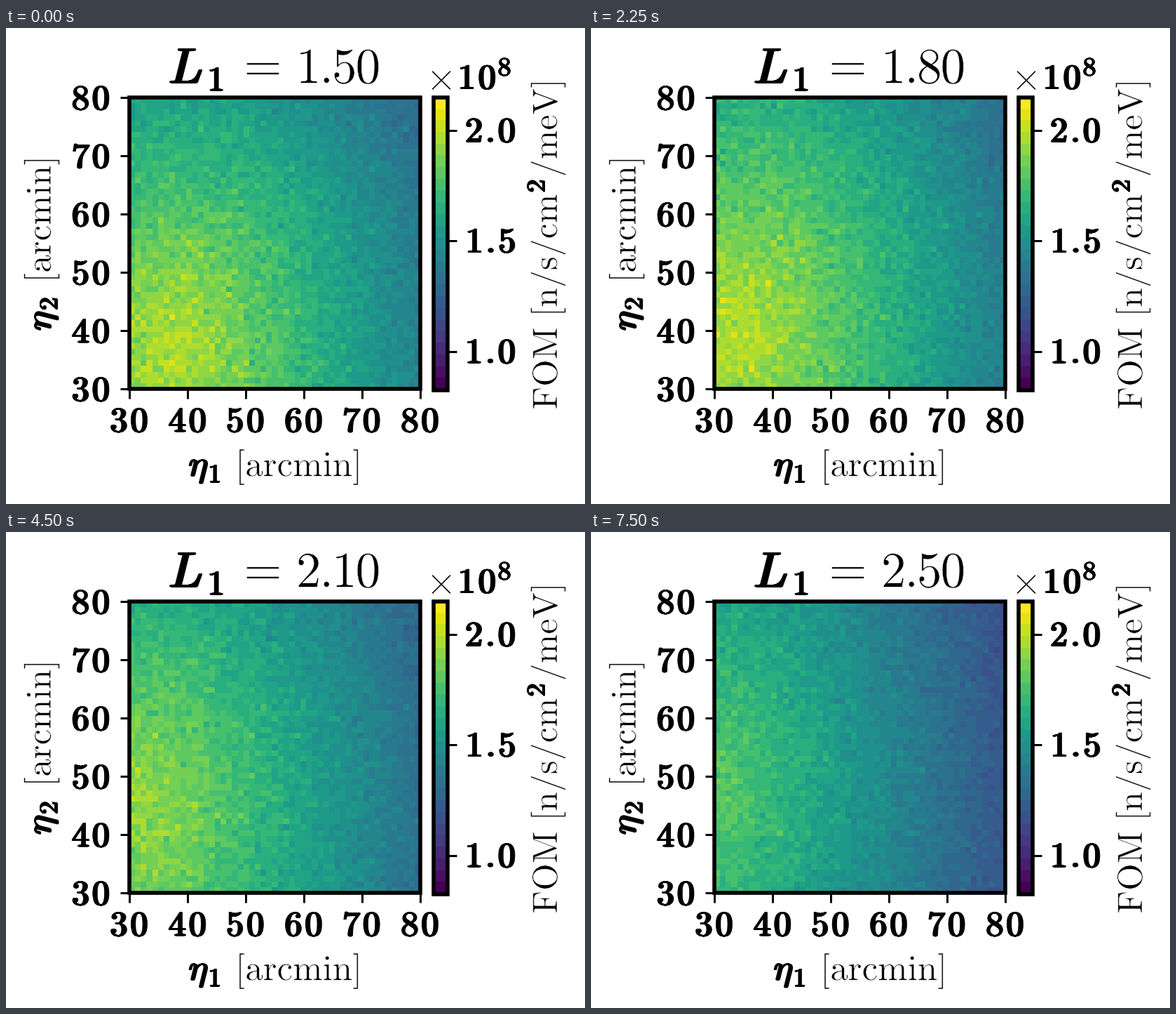
A matplotlib script that plays this animation: 826x678 px, repeating every 8 s.

```python
import numpy as np
import matplotlib.pyplot as plt
from matplotlib.animation import FuncAnimation
from matplotlib.patches import PathPatch, Rectangle
from matplotlib.path import Path
from matplotlib.textpath import TextPath
from matplotlib.transforms import Affine2D

W, H, DPI = 826, 678, 64
PX = 72 / DPI            # points per pixel
LEVELS = 25
CELLS = 51
LEFT, RIGHT, TOP, BOTTOM = 176, 591, 99, 514

plt.rcParams["mathtext.fontset"] = "cm"
fig = plt.figure(figsize=(W / DPI, H / DPI), dpi=DPI, facecolor="white")
ax = fig.add_axes([0, 0, 1, 1])
ax.axis("off")
viridis = plt.get_cmap("viridis", LEVELS)


def tracked(s, gap):
    """Math string with extra space between its characters."""
    out = s[0]
    for prev, char in zip(s, s[1:]):
        # a lone dot already carries 0.2 of punctuation space
        space = gap - 0.2 if prev == "." else gap
        out += rf"\hspace{{{space:.3f}}}{char}"
    return rf"$\mathrm{{{out}}}$"


def glyphs(s, size, x, y, anchor, upright=True, bold=False):
    """Text outline whose ink box has its anchor point at x, y."""
    path = TextPath((0, 0), s, size=size)
    if bold:
        # overlapping copies widen the stems and keep the hairlines thin
        path = Path.make_compound_path(*(
            path.transformed(Affine2D().translate(k * 0.015 * size, 0))
            for k in range(4)))
    turn = Affine2D().scale(1, -1)
    if not upright:
        turn.rotate_deg(-90)
    path = path.transformed(turn)
    box = path.get_extents()
    px = box.x0 + anchor[0] * box.width
    py = box.y0 + anchor[1] * box.height
    return path.transformed(Affine2D().translate(x - px, y - py))


def text(*args, bold=False, **kw):
    """Black text; a white rim makes the regular weight lighter."""
    patch = PathPatch(glyphs(*args, bold=bold, **kw), fc="black",
                      ec="black" if bold else "white", lw=0.6 * PX, zorder=5)
    return ax.add_patch(patch)


def bold(s, size, x, y, anchor, **kw):
    text(s, size, x, y, anchor, bold=True, **kw)


def number(s, x, y, anchor):
    bold(tracked(s, 0.09), 50, x, y, anchor)


def frame(x0, y0, x1, y1):
    ax.add_patch(Rectangle((x0, y0), x1 - x0, y1 - y0, fill=False,
                           ec="black", lw=5.6 * PX, zorder=4,
                           joinstyle="miter"))


def tick(xs, ys):
    ax.plot(xs, ys, color="black", lw=3 * PX, solid_capstyle="butt", zorder=3)


def heat(step):
    """Noisy rounded cone that drifts and fades as the length grows."""
    u = step / 10
    eta = np.linspace(30, 80, CELLS)
    x, y = np.meshgrid(eta, eta)
    peak = np.interp(u, [0, 0.1, 0.2, 0.4, 0.6, 0.8, 1],
                     [0.87, 0.885, 0.88, 0.86, 0.825, 0.78, 0.735])
    p = (x - 37 + 9 * u) * (0.0105 - 0.0013 * u)
    q = (y - 36 - 12 * u) * (0.0073 - 0.0018 * u)
    t = peak - np.sqrt(p**2 + q**2 + 0.03**2) + 0.03
    spread = 0.018 + 0.035 * np.clip(t - 0.3, 0, 1)
    t = t + spread * np.random.default_rng(40 + step).normal(size=t.shape)
    return np.clip(t, 0, 0.999)


def title(step):
    s = tracked(f"{1.5 + step / 10:.2f}", -0.038)
    return glyphs(s, 72, 531.5, 80, (1, 1))


# heat map with its axes
image = ax.imshow(heat(0), cmap=viridis, vmin=0, vmax=1, origin="lower",
                  extent=(LEFT, RIGHT, BOTTOM, TOP), aspect="auto",
                  interpolation="nearest")
frame(LEFT, TOP, RIGHT, BOTTOM)
for k in range(6):
    x, y = LEFT + 83 * k, BOTTOM - 83 * k
    tick([x, x], [BOTTOM, 528])
    tick([163, LEFT], [y, y])
    number(str(30 + 10 * k), x - 0.5, 576, (0.5, 1))
    number(str(30 + 10 * k), 147, y + 18, (1, 1))

# colour bar
ax.imshow(np.arange(LEVELS)[:, None], cmap=viridis, origin="lower",
          extent=(610, 630, 515.5, 98.5), aspect="auto",
          interpolation="nearest")
frame(610, 98.5, 630, 515.5)
for value, y in (("2.0", 145.7), ("1.5", 303), ("1.0", 460.6)):
    tick([630, 643], [y, y])
    number(value, 726, y + 17.5, (1, 1))
text(r"$\times$", 56, 621, 74.5, (0.5, 0.5))
number("10", 673, 87.5, (0.5, 1))
bold(r"$\mathrm{8}$", 37, 711, 55.5, (0.5, 0.5))

# axis labels
bold(r"$\eta$", 52, 261, 649, (0, 1))
bold(r"$\mathrm{1}$", 37, 291, 647, (0, 1))
text(r"$\mathrm{[arcmin]}$", 51, 333, 651, (0, 1))

bold(r"$\eta$", 52, 75, 430.5, (1, 1), upright=False)
bold(r"$\mathrm{2}$", 37, 73, 401, (1, 1), upright=False)
text(r"$\mathrm{[arcmin]}$", 51, 76.5, 357, (1, 1), upright=False)

text(r"$\mathrm{FOM\ [n/s/cm}$", 50, 798.5, 542, (1, 1), upright=False)
bold(r"$\mathrm{2}$", 37, 756, 225, (0.5, 0.5), upright=False)
text(r"$\mathrm{/meV]}$", 50, 798.5, 78, (1, 0), upright=False)

# heading
bold(r"$L$", 71, 233.5, 78, (0, 1))
bold(r"$\mathrm{1}$", 49, 300, 89, (0.5, 1))
text(r"$=$", 70, 366.5, 58, (0.5, 0.5))
digits = text(r"$\mathrm{1.50}$", 72, 531.5, 80, (1, 1))

ax.set_xlim(0, W)
ax.set_ylim(H, 0)

maps = [heat(k) for k in range(11)]
titles = [title(k) for k in range(11)]


def update(i):
    step = i // 3
    image.set_data(maps[step])
    digits.set_path(titles[step])
    return image, digits


anim = FuncAnimation(fig, update, frames=32, interval=250, repeat=True,
                     repeat_delay=0, blit=False)
plt.show()
```
